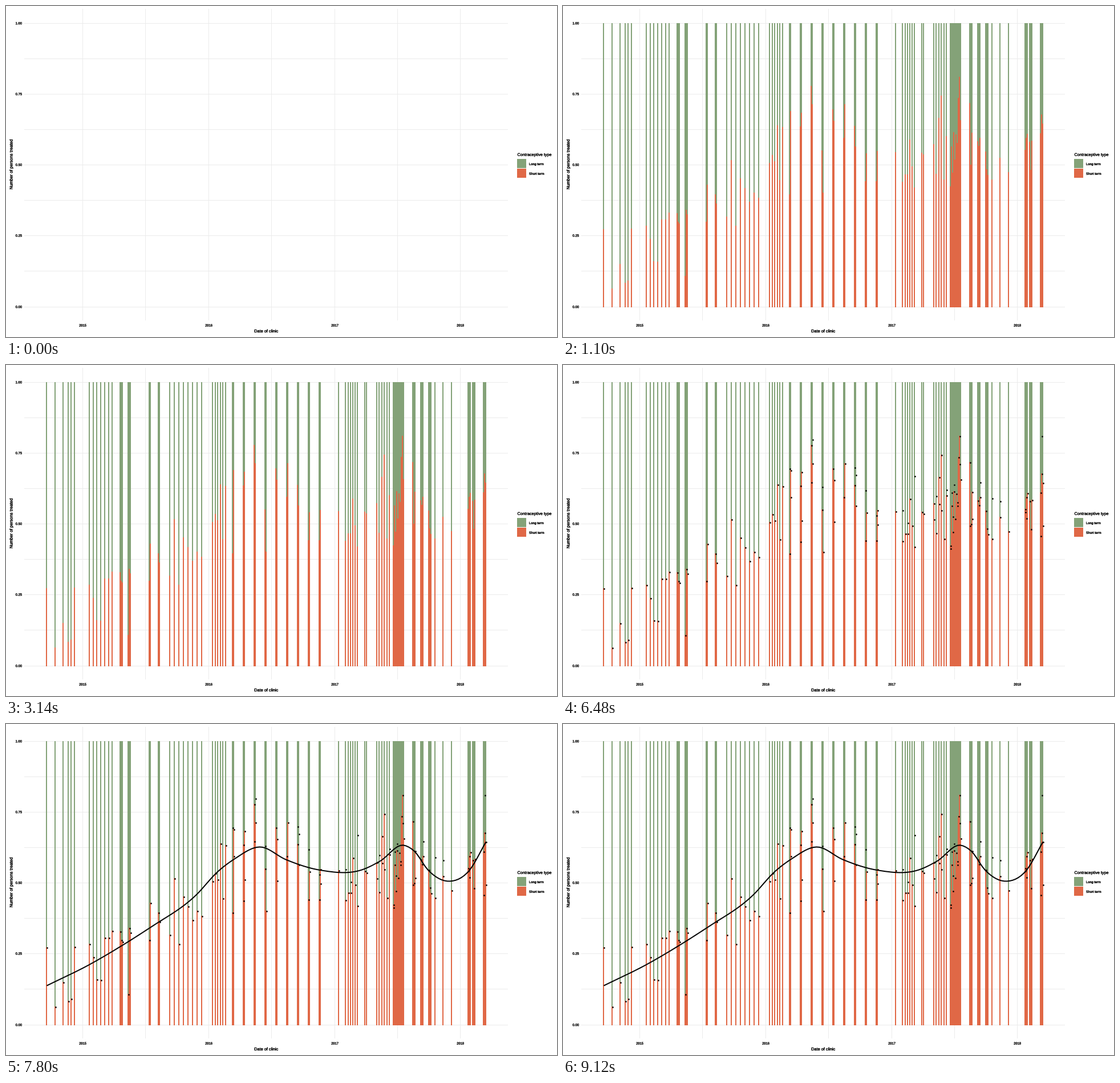
Animation of 966x580 px, one loop 10 s. Source, as a matplotlib script:

```python
import numpy as np
import matplotlib.pyplot as plt
from matplotlib.animation import FuncAnimation
from matplotlib.collections import PolyCollection
from matplotlib.patheffects import withStroke

WIDTH, HEIGHT, DPI = 966, 580, 100
PX = 72 / DPI  # one pixel in points
INTERVAL, FRAMES = 100, 100
BARS_AT, POINTS_AT, TREND_AT = 1100, 4500, 7800

GREEN, RED, GRID = "#84a278", "#e06846", "#ebebeb"
TOP, BASE = 30, 528
BAR = 2          # bar width
BUSY_FROM = 390  # from here on a day may hold two clinics
SPREAD = 45      # scatter of the clinics around the trend

# Clinic rounds: first day, step to the next round, rounds, days per round
ROUNDS = [
    (71, 14.5, 3, 1), (109, 5.5, 3, 1), (146, 6.7, 7, 1), (200, 14, 2, 3),
    (251, 16, 2, 2), (287, 8, 8, 1), (362, 4.6, 6, 1), (397, 19, 9, 2),
    (583, 12, 2, 1), (600, 4, 5, 1), (629, 3.5, 2, 1), (650, 4.4, 6, 1),
    (679, 2, 10, 1), (713, 14, 3, 3), (752, 14.5, 3, 1), (810, 8.5, 2, 3),
    (837, 2, 3, 1),
]
TREND_KEYS = [
    (71, 458), (146, 421), (200, 389.5), (251, 357), (333, 299), (371, 258),
    (400, 236), (445, 215), (490, 237), (550, 255.5), (625, 254.5), (655, 240),
    (697, 212), (715, 222), (740, 256), (777, 275), (811, 257), (841, 206),
]

plt.rcParams["font.family"] = "Liberation Sans"
fig = plt.figure(figsize=(WIDTH / DPI, HEIGHT / DPI), dpi=DPI, facecolor="white")
ax = fig.add_axes([0, 0, 1, 1])
ax.set_xlim(0, WIDTH)
ax.set_ylim(HEIGHT, 0)
ax.axis("off")


def trend_at(x):
    """Height of a smooth cubic curve through the trend keys."""
    kx, ky = np.array(TREND_KEYS, float).T
    slope = np.gradient(ky, kx)
    i = np.clip(np.searchsorted(kx, x) - 1, 0, len(kx) - 2)
    width = kx[i + 1] - kx[i]
    t = (x - kx[i]) / width
    ends = ky[i] + (ky[i + 1] - ky[i]) * t * t * (3 - 2 * t)
    return ends + width * t * (1 - t) * (slope[i] * (1 - t) - slope[i + 1] * t)


def make_clinics():
    """Day and short-term share of every clinic, as stage positions."""
    rng = np.random.default_rng(4)
    days = [round(first + step * k) + BAR * d
            for first, step, rounds, length in ROUNDS
            for k in range(rounds) for d in range(length)]
    counts = [rng.integers(1, 3) if day > BUSY_FROM else 1 for day in days]
    x = np.repeat(days, counts)
    noise = np.clip(rng.normal(0, SPREAD, len(x)), -110, 110)
    return x, np.clip(np.round(trend_at(x) + noise), 124, 506)


def label(x, y, text, size, ha="center", **style):
    ax.text(x, y, text, fontsize=size * PX, ha=ha, va="center", color="black",
            path_effects=[withStroke(linewidth=0.25 * PX, foreground="black")], **style)


def box(x0, y0, x1, y1):
    return [(x0, y0), (x1, y0), (x1, y1), (x0, y1)]


def add_boxes(boxes, colors, zorder):
    return ax.add_collection(PolyCollection(
        boxes, facecolors=colors, linewidths=0, antialiaseds=False, zorder=zorder))


def draw_grid():
    rows = [int(30.5 + 62.07 * i) for i in range(9)]
    columns = [int(134.5 + 110.4 * i) for i in range(7)]
    lines = [box(32, y, 880, y + 1) for y in rows]
    lines += [box(x, 5, x + 1, 551) for x in columns]
    add_boxes(lines, GRID, 1)
    for i, y in enumerate(rows[::2]):
        label(28, y + 0.7, f"{1 - i / 4:.2f}", 5.9, ha="right")
    for i, x in enumerate(columns[::2]):
        label(x + 0.5, 560, str(2015 + i), 5.7)
    label(456, 570.5, "Date of clinic", 7.35)
    label(10, 278, "Number of persons treated", 7.4, rotation=90)


def draw_legend():
    label(896.5, 261.3, "Contraceptive type", 7.2, ha="left")
    for i, (color, text) in enumerate([(GREEN, "Long term"), (RED, "Short term")]):
        y = 268 + 17 * i
        add_boxes([box(896, y, 912, y + 16)], color, 1)
        label(917, y + 9.3, text, 5.7, ha="left")


def draw_bars(days, shares):
    halves = []
    for x, y in zip(days, shares):
        halves += [box(x - 1, TOP, x - 1 + BAR, y), box(x - 1, y, x - 1 + BAR, BASE)]
    return add_boxes(halves, [GREEN, RED], 2)


draw_grid()
draw_legend()
days, shares = make_clinics()
bars = draw_bars(days, shares)
points, = ax.plot(days + 0.5, shares + 0.5, "o", color="black",
                  markersize=2.7 * PX, markeredgewidth=0, zorder=3)
curve_x = np.linspace(71, 841, 160)
trend, = ax.plot(curve_x + 0.5, trend_at(curve_x) + 0.5, color="black",
                 linewidth=2 * PX, solid_capstyle="butt", zorder=4)
LAYERS = [(bars, BARS_AT), (points, POINTS_AT), (trend, TREND_AT)]


def update(frame):
    for layer, start in LAYERS:
        layer.set_visible(frame * INTERVAL >= start)
    return [layer for layer, _ in LAYERS]


anim = FuncAnimation(fig, update, frames=FRAMES, interval=INTERVAL, repeat=True)
plt.show()
```
